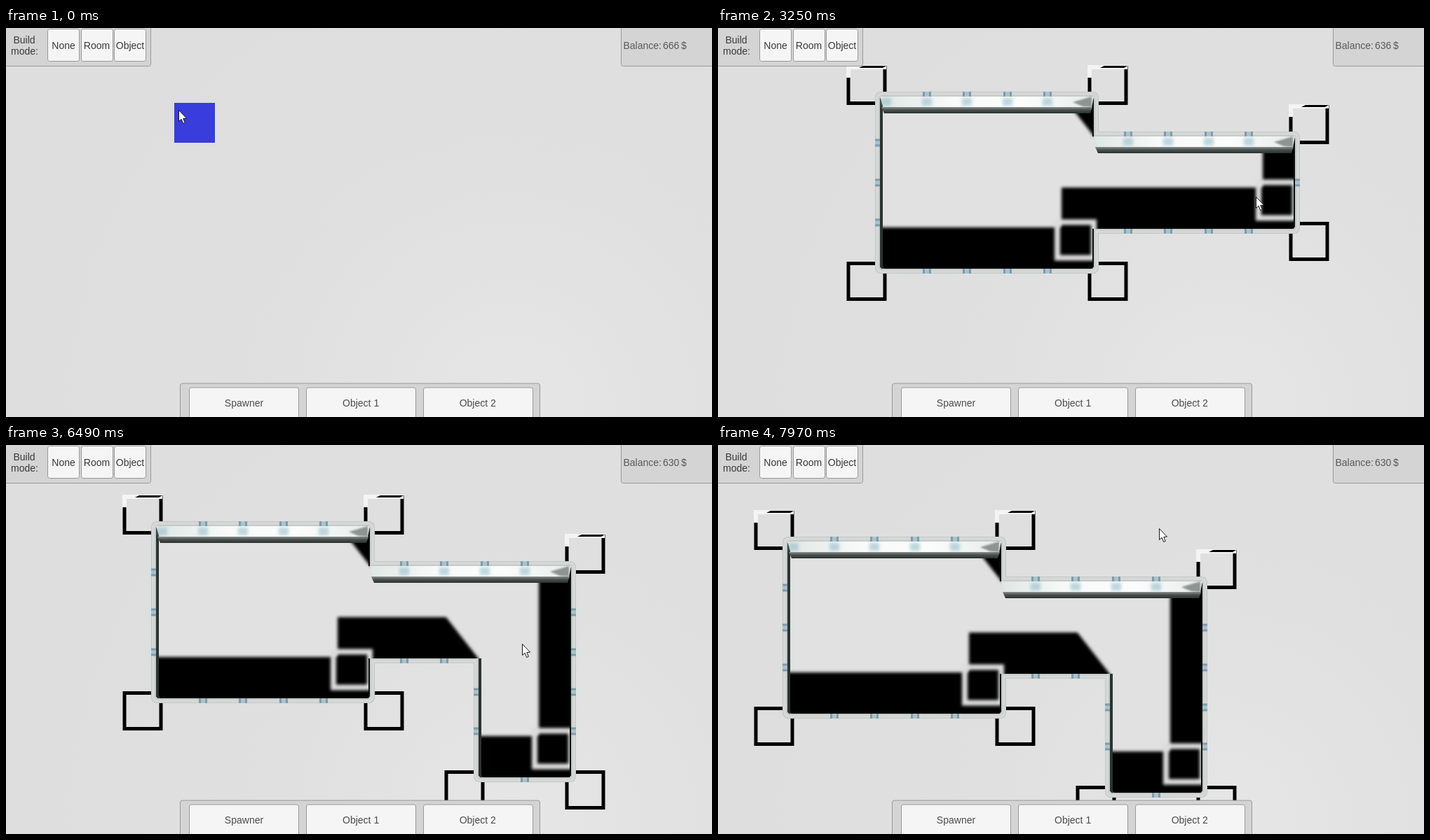
Recreate the animation shown at these times as an HTML page with a canvas. Size 1007 by 556 pixels, loop 8 s.

```html
<!DOCTYPE html>
<html lang="en">
<head>
<meta charset="utf-8">
<title>Room builder</title>
<style>
html, body { margin: 0; width: 100%; height: 100%; overflow: hidden; background: #dfdfdf; }
canvas { display: block; }
</style>
</head>
<body>
<canvas id="stage" width="1007" height="556"></canvas>
<script>
const W = 1007, H = 556, LOOP = 8000;
const view = document.getElementById('stage').getContext('2d');

const grid = { x: 240.4, y: 107.4, w: 57.4, h: 56.8 };
const gx = col => Math.round(grid.x + grid.w * col);
const gy = row => Math.round(grid.y + grid.h * row);

// Inner and outer distance of the wall from the cells it encloses
const INNER = 9, OUTER = 16;
// How far a wall throws its shadow
const CAST = { x: -46, y: -59 };

// Cursor strokes: start time, end time, where it arrives
const pointer = { x: 246, y: 117 };
const strokes = [
  [80, 880, 488, 294], [960, 1180, 515, 323], [1470, 1710, 563, 321], [1710, 2210, 535, 175],
  [2290, 2850, 740, 276], [2850, 3110, 767, 241], [3410, 4210, 765, 388], [4270, 4500, 733, 428],
  [4770, 5310, 741, 310], [5970, 6490, 736, 284], [6490, 7370, 709, 174], [7370, 7970, 629, 119]
];
// Press and release of the mouse button
const drags = [[0, 1470], [2290, 3250], [3620, 4770]];

const progress = (t, from, to) => Math.min(1, Math.max(0, (t - from) / (to - from)));

function cursorAt(t) {
  let { x, y } = pointer;
  for (const [from, to, endX, endY] of strokes) {
    const u = progress(t, from, to);
    x += (endX - x) * u;
    y += (endY - y) * u;
  }
  return { x, y };
}

// The camera drifts diagonally, then sideways
function panAt(t) {
  const first = progress(t, 6290, 6740), second = progress(t, 7130, LOOP);
  return { x: -37.5 * first - 97.5 * second, y: 40 * first };
}

function cellAt(t) {
  const { x, y } = cursorAt(t);
  return { col: Math.floor((x - grid.x) / grid.w), row: Math.floor((y - grid.y) / grid.h) };
}

function selection(from, to) {
  const a = cellAt(from), b = cellAt(to);
  return {
    col: Math.min(a.col, b.col), row: Math.min(a.row, b.row),
    cols: Math.abs(a.col - b.col) + 1, rows: Math.abs(a.row - b.row) + 1
  };
}

const rooms = drags.map(([from, to]) => selection(from, to));

function newLayer() {
  const canvas = document.createElement('canvas');
  canvas.width = W;
  canvas.height = H;
  return canvas.getContext('2d');
}

function shape(list, pad) {
  const path = new Path2D();
  for (const { col, row, cols, rows } of list) {
    const x = gx(col) - pad, y = gy(row) - pad;
    path.roundRect(x, y, gx(col + cols) + pad - x, gy(row + rows) + pad - y, pad / 2);
  }
  return path;
}

function poly(c, points, color) {
  c.beginPath();
  points.forEach(p => c.lineTo(...p));
  c.closePath();
  c.fillStyle = color;
  c.fill();
}

function gradient(c, x1, y1, x2, y2, ...colors) {
  const g = c.createLinearGradient(x1, y1, x2, y2);
  colors.forEach((color, i) => g.addColorStop(i / (colors.length - 1), color));
  return g;
}

// Everything outside the floor, smeared along a direction
function sweep(floor, dx, dy, color) {
  const mask = newLayer(), out = newLayer();
  mask.fillStyle = color;
  mask.fillRect(0, 0, W, H);
  mask.globalCompositeOperation = 'destination-out';
  mask.fill(floor);
  const steps = Math.max(Math.abs(dx), Math.abs(dy));
  for (let i = 0; i <= steps; i++) out.drawImage(mask.canvas, dx * i / steps, dy * i / steps);
  return out.canvas;
}

function strokeBox(c, { x, y }) {
  c.strokeRect(x + 3, y + 2.5, 52, 51);
}

function cornerBox(c, corner) {
  const { x, y, top } = corner;
  c.strokeStyle = '#000';
  c.lineWidth = 5;
  strokeBox(c, corner);
  if (!top) return;
  c.fillStyle = '#f4f4f4';
  c.fillRect(x, y - 1, 6, 18);
  c.fillRect(x, y - 1, 57, 6);
  poly(c, [[x + 18, y + 3], [x + 24, y], [x + 57, y], [x + 52, y + 3]], '#000');
}

function pane(c, x, y, w, h) {
  c.fillStyle = '#7f9ca8';
  c.fillRect(x - w / 2, y - h / 2, w, h);
  c.fillStyle = '#a9c3cd';
  if (w > h) c.fillRect(x - w / 2 + 3, y - h / 2, w - 6, h);
  else c.fillRect(x - w / 2, y - h / 2 + 3, w, h - 6);
}

// Inner side of a back wall, with glowing windows
function wallFace(c, x1, x2, y, room) {
  poly(c, [[x1, y + 2], [x2, y + 2], [x2 - 3, y + 18], [x1 + 5, y + 18]],
    gradient(c, x1, 0, x2, 0, '#dfe7e4', '#f7faf9', '#fbfdfc', '#e6ecea'));
  poly(c, [[x1 + 2, y + 17], [x2 - 2, y + 17], [x2 - 5, y + 26], [x1 + 6, y + 26]],
    gradient(c, 0, y + 16, 0, y + 26, '#9aa19f', '#4a5250', '#2a312f'));
  for (let i = 0; i < room.cols; i++) {
    const x = gx(room.col + i);
    if (x < x1) continue;
    c.filter = 'blur(2px)';
    c.fillStyle = 'rgba(150,188,203,.6)';
    c.fillRect(x - 7, y + 4, 14, 11);
    c.filter = 'none';
  }
  c.filter = 'blur(1px)';
  poly(c, [[x2 - 30, y + 10], [x2 - 3, y + 2], [x2 - 3, y + 17], [x2 - 16, y + 16]], 'rgba(50,58,55,.5)');
  c.filter = 'none';
}

function renderRooms(list) {
  const c = newLayer();
  const inside = (col, row) => list.some(r =>
    col >= r.col && col < r.col + r.cols && row >= r.row && row < r.row + r.rows);

  // A box stands diagonally off every convex corner
  const corners = [];
  for (const { col, row, cols, rows } of list) {
    for (const dx of [-1, 1]) for (const dy of [-1, 1]) {
      const cx = dx < 0 ? col - 1 : col + cols, cy = dy < 0 ? row - 1 : row + rows;
      if (inside(cx, cy) || inside(cx - dx, cy) || inside(cx, cy - dy)) continue;
      corners.push({ x: gx(cx), y: gy(cy) + (dy < 0 ? 3 : -1), top: dy < 0 });
    }
  }
  corners.forEach(corner => cornerBox(c, corner));

  const floor = shape(list, INNER);
  [[OUTER, '#c3c7c5'], [OUTER - 1, '#d5d8d6'], [INNER + 2, '#c5cac7']].forEach(([pad, color]) => {
    c.fillStyle = color;
    c.fill(shape(list, pad));
  });

  c.save();
  c.clip(floor);
  c.fillStyle = '#e1e1e1';
  c.fillRect(0, 0, W, H);
  c.filter = 'blur(2px)';
  c.drawImage(sweep(floor, CAST.x, CAST.y, '#000'), 0, 0);
  c.translate(CAST.x, CAST.y);
  c.strokeStyle = '#dcdcdc';
  c.lineWidth = 8;
  corners.forEach(corner => strokeBox(c, corner));
  c.translate(-CAST.x, -CAST.y);
  c.filter = 'none';
  c.drawImage(sweep(floor, 4, 0, '#2b3430'), 0, 0);
  c.drawImage(sweep(floor, -2, 0, '#0c100e'), 0, 0);
  c.restore();

  for (const room of list) {
    if (inside(room.col, room.row - 1)) continue;
    const inset = inside(room.col - 1, room.row) ? INNER : -INNER;
    wallFace(c, gx(room.col) + inset, gx(room.col + room.cols) + INNER, gy(room.row) - 11, room);
  }

  // Windows sit where two neighbouring cells share a straight wall
  const mid = (INNER + OUTER) / 2;
  for (let col = 0; col < 10; col++) for (let row = 0; row < 6; row++) {
    const wall = (x, y, dx, dy) => inside(x, y) && !inside(x + dx, y + dy);
    for (const d of [-1, 1]) {
      if (wall(col, row, d, 0) && wall(col, row - 1, d, 0))
        pane(c, gx(d < 0 ? col : col + 1) + d * mid, gy(row), 7, 11);
      if (wall(col, row, 0, d) && wall(col - 1, row, 0, d))
        pane(c, gx(col), gy(d < 0 ? row : row + 1) + d * mid, 12, 7);
    }
  }
  return c.canvas;
}
const layers = rooms.map((_, i) => renderRooms(rooms.slice(0, i + 1)));

function box(x, y, w, h, fill) {
  view.beginPath();
  view.roundRect(x + .5, y + .5, w, h, 3);
  view.fillStyle = fill;
  view.fill();
  view.strokeStyle = '#999';
  view.lineWidth = 1;
  view.stroke();
}

function label(text, x, y, color, align = 'center') {
  view.fillStyle = color;
  view.textAlign = align;
  view.fillText(text, x, y);
}

// A row of equal buttons
function buttons(names, x, y, w, h, pitch, baseline, color) {
  names.forEach((name, i) => {
    box(Math.ceil(x + pitch * i), y, w, h, '#f5f5f5');
    label(name, x + pitch * i + w / 2 + .5, baseline, color);
  });
}

function drawInterface(balance) {
  const panel = '#d4d4d4', dark = '#3a3a3a', soft = '#5a5a5a';
  view.font = '14px "Liberation Sans", Arial, sans-serif';
  box(-6, -6, 212, 60, panel);
  label('Build', 26, 22, dark);
  label('mode:', 26.5, 38, dark);
  buttons(['None', 'Room', 'Object'], 59, 1, 45, 46, 47.5, 30, dark);
  box(877, -6, 140, 60, panel);
  label('Balance:', 880.5, 30, soft, 'left');
  label(balance, 937, 30, soft, 'left');
  label('$', 963, 30, soft, 'left');
  box(248, 507.5, 513, 60, panel);
  buttons(['Spawner', 'Object 1', 'Object 2'], 261, 513.5, 156, 50, 166.6, 541, '#4c4c4c');
}

function drawSelection({ col, row, cols, rows }) {
  view.fillStyle = '#383ddb';
  view.fillRect(gx(col), gy(row), gx(col + cols) - gx(col), gy(row + rows) - gy(row));
}

function drawCursor({ x, y }) {
  view.save();
  view.translate(Math.round(x) + .5, Math.round(y) + .5);
  poly(view, [[0, 0], [0, 16], [3.6, 12.8], [6.2, 19], [8.8, 17.9], [6.3, 12], [11, 11.6]], '#fff');
  view.strokeStyle = '#16161c';
  view.lineWidth = 1;
  view.stroke();
  view.restore();
}

const glow = view.createRadialGradient(720, 540, 0, 720, 540, 640);
['#e6e6e6', '#e3e3e3', '#e0e0e0', '#dfdfdf', '#dedede'].forEach((color, i) => glow.addColorStop(i / 4, color));

function draw(t) {
  view.fillStyle = glow;
  view.fillRect(0, 0, W, H);
  const built = drags.filter(([, to]) => t >= to).length;
  if (built) {
    const pan = panAt(t);
    view.drawImage(layers[built - 1], Math.round(pan.x), Math.round(pan.y));
  }
  const drag = drags.find(([from, to]) => t >= from && t < to);
  if (drag) drawSelection(selection(drag[0], t));
  // Every cell costs one dollar
  drawInterface(rooms.slice(0, built).reduce((sum, r) => sum - r.cols * r.rows, 666));
  drawCursor(cursorAt(t));
}

const began = performance.now();
function tick() {
  draw((performance.now() - began) % LOOP);
  requestAnimationFrame(tick);
}
draw(0);
requestAnimationFrame(tick);
</script>
</body>
</html>
```
